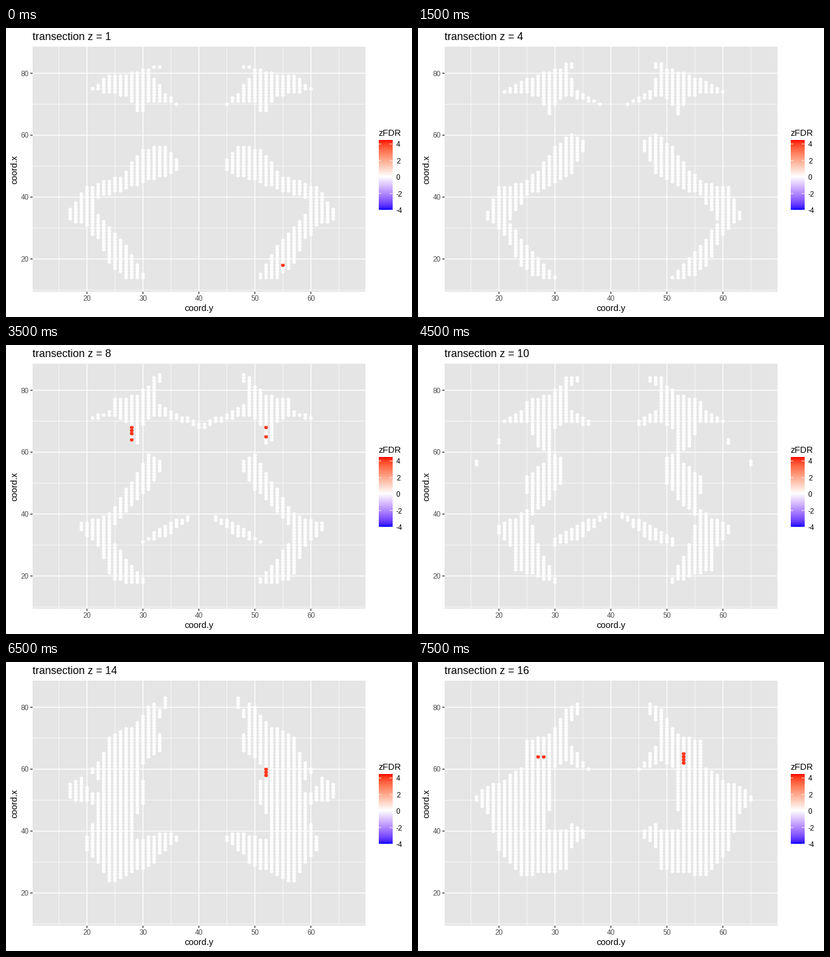
A matplotlib script that plays this animation: 672x480 px, repeating every 8000 ms.

```python
import numpy as np
import matplotlib.pyplot as plt
from matplotlib.animation import FuncAnimation
from matplotlib.colors import ListedColormap, TwoSlopeNorm
from matplotlib.patches import Rectangle

W, H, DPI = 672, 480, 96
LEFT, RIGHT, TOP, BOTTOM = 44, 594.6, 31, 438
NX, NY = 70, 90
DX, DY = 9.265, 5.14
MIRROR = 81
plt.rcParams["font.family"] = "Liberation Sans"


def px(x):
    return 134 + (x - 20) * DX


def py(y):
    return 75.2 + (80 - y) * DY


# Key sections: bands through (column, low, high) points of the left half,
# mirrored to the right half.
masks = {}


def shape(z, *bands):
    mask = masks[z] = np.zeros((NY, NX), bool)
    for band in bands:
        x, low, high = zip(*band)
        for c in range(x[0], x[-1] + 1):
            lo, hi = np.interp(c, x, low), np.interp(c, x, high)
            mask[int(lo + .5):int(hi + .5) + 1, [c, MIRROR - c]] = True


shape(1,
      [(21, 75, 75), (24, 74, 79), (27, 73, 79), (29, 68, 80), (30, 68, 81),
       (31, 71, 81), (34, 71, 73), (36, 70, 70)],
      [(32, 82, 82), (33, 82, 82)],
      [(17, 33, 36), (20, 31, 43), (21, 28, 43)],
      [(22, 40, 44), (26, 42, 46), (30, 45, 55), (34, 47, 56), (36, 49, 52)],
      [(22, 27, 34), (24, 19, 30), (27, 14, 24), (30, 14, 15)])
shape(4,
      [(21, 74, 74), (24, 74, 77), (27, 73, 79), (29, 67, 80), (30, 70, 81),
       (32, 73, 81), (34, 72, 74), (38, 70, 70)],
      [(32, 82, 83), (33, 82, 83)],
      [(18, 33, 35), (20, 30, 43), (22, 33, 43), (25, 41, 45), (27, 42, 48),
       (30, 45, 56), (33, 48, 60), (35, 55, 58)],
      [(21, 28, 34), (24, 18, 26), (26, 15, 22), (29, 14, 16), (30, 14, 14)])
shape(8,
      [(21, 71, 71), (24, 72, 73), (25, 72, 77), (27, 70, 77), (28, 64, 78),
       (29, 63, 78), (30, 69, 80), (32, 72, 82), (33, 72, 75), (36, 71, 72),
       (40, 68, 69)],
      [(32, 80, 84), (33, 83, 85)],
      [(19, 35, 37), (22, 30, 38), (24, 21, 40), (25, 37, 42), (29, 45, 53),
       (31, 48, 59), (33, 54, 57)],
      [(25, 19, 30), (28, 18, 23), (30, 18, 19)],
      [(30, 31, 31), (34, 33, 36), (38, 38, 39)])
shape(10,
      [(21, 70, 70), (24, 70, 73), (25, 70, 76), (27, 62, 77), (29, 60, 78),
       (30, 68, 80), (32, 70, 82), (33, 70, 73), (36, 69, 70)],
      [(32, 81, 84), (34, 83, 84)],
      [(25, 47, 52), (26, 40, 53), (28, 43, 56), (29, 45, 60), (31, 50, 58)],
      [(20, 34, 36), (22, 30, 38), (23, 22, 38), (25, 21, 41), (27, 20, 30),
       (30, 18, 19)],
      [(30, 30, 32), (34, 32, 36), (39, 39, 40)],
      [(20, 63, 64)], [(16, 56, 57)])
shape(12,
      [(15, 52, 53), (18, 54, 57), (21, 58, 64), (24, 60, 72), (25, 46, 74),
       (27, 41, 75), (29, 46, 77), (30, 66, 78), (32, 68, 83), (33, 68, 72),
       (36, 67, 68)],
      [(32, 82, 83), (34, 82, 84)], [(30, 48, 57)],
      [(20, 34, 36), (22, 31, 37), (24, 22, 39), (26, 24, 42), (27, 25, 33),
       (30, 31, 34), (34, 32, 37), (39, 41, 41)])
shape(16,
      [(16, 50, 51), (18, 46, 54), (20, 34, 55), (24, 26, 60), (25, 26, 69),
       (28, 27, 70), (29, 47, 71), (30, 61, 73), (32, 63, 79), (33, 62, 67),
       (36, 60, 60)],
      [(33, 76, 80), (34, 78, 81)],
      [(29, 27, 40), (32, 28, 40), (33, 35, 42), (35, 38, 40)])

# Significant voxels: (column, low, high) runs per section.
hits = {
    1: [(55, 18, 18)],
    8: [(28, 64, 64), (28, 66, 68), (52, 65, 65), (52, 68, 68)],
    14: [(52, 58, 60)],
    16: [(27, 64, 64), (28, 64, 64), (53, 62, 65)],
}

# Sections in between blend the signed distance fields of their neighbours.
gy, gx = np.mgrid[10:NY, 12:NX]
cells = np.column_stack([gx.ravel() * DX, gy.ravel() * DY]).astype("f4")
dist = np.hypot(*(cells[:, None, k] - cells[None, :, k] for k in (0, 1)))


def signed(mask):
    on = mask[10:, 12:].ravel()
    return dist[:, on].min(1) - dist[:, ~on].min(1)


keys = sorted(masks)
fields = {z: signed(masks[z]) for z in keys}


def section(z):
    if z in masks:
        return masks[z].copy()
    a = max(k for k in keys if k < z)
    b = min(k for k in keys if k > z)
    t = (z - a) / (b - a)
    mask = np.zeros((NY, NX), bool)
    blend = (1 - t) * fields[a] + t * fields[b]
    mask[10:, 12:] = (blend <= 1).reshape(gx.shape)
    return mask


def lab_to_rgb(lab):
    fy = (lab[:, 0] + 16) / 116
    f = np.column_stack([fy + lab[:, 1] / 500, fy, fy - lab[:, 2] / 200])
    xyz = np.where(f > 6 / 29, f ** 3, (f - 4 / 29) * 108 / 841)
    xyz *= [.9505, 1, 1.089]
    lin = xyz @ np.array([[3.2406, -.9689, .0557],
                          [-1.5372, 1.8758, -.204],
                          [-.4986, .0415, 1.057]])
    lin = lin.clip(0, 1)
    return np.where(lin > .0031308, 1.055 * lin ** (1 / 2.4) - .055,
                    12.92 * lin).clip(0, 1)


BLUE, WHITE, RED = (32.3, 79.19, -107.86), (100, 0, 0), (53.24, 80.09, 67.2)
ramp = np.vstack([np.linspace(BLUE, WHITE, 128), np.linspace(WHITE, RED, 128)])
cmap = ListedColormap(lab_to_rgb(ramp))
norm = TwoSlopeNorm(vmin=-4, vcenter=0, vmax=4.37)

fig = plt.figure(figsize=(W / DPI, H / DPI), dpi=DPI, facecolor="white")
ax = fig.add_axes([0, 0, 1, 1])
ax.axis("off")


def text(x, y, s, size, color="black", **kw):
    return ax.text(x, y, s, fontsize=size, color=color, **kw)


def line(x, y, color, lw, z):
    ax.plot(x, y, color=color, lw=lw, solid_capstyle="butt", zorder=z,
            snap=False)


ax.add_patch(Rectangle((LEFT, TOP), RIGHT - LEFT, BOTTOM - TOP,
                       fc="#e5e5e5", lw=0, zorder=0))
for v in range(10, 81, 10):
    major = v % 20 == 0
    line([LEFT, RIGHT], [py(v)] * 2, "white", 1.07 if major else .53, 1 + major)
    if major:
        line([LEFT - 3.7, LEFT], [py(v)] * 2, "#333333", 1.07, 2)
        text(38, py(v) + 4.3, v, 8.8, "#4d4d4d", ha="right")
for v in range(15, 66, 5):
    major = v % 10 == 0
    line([px(v)] * 2, [TOP, BOTTOM], "white", 1.07 if major else .53, 1 + major)
    if major:
        line([px(v)] * 2, [BOTTOM, BOTTOM + 3.7], "#333333", 1.07, 2)
        text(px(v), 453.3, v, 8.8, "#4d4d4d", ha="center")

text(319.3, 470, "coord.y", 11, ha="center")
text(18, 234.5, "coord.x", 11, ha="center", rotation=90,
     rotation_mode="anchor")
title = text(44, 20, "", 13.2)

# Colour bar
X0, X1, Y0, Y1 = 616.5, 639.5, 302.3, 187.2
ax.imshow(np.linspace(-4, 4.37, 256)[:, None], cmap=cmap, norm=norm,
          extent=(X0, X1, Y0, Y1), origin="lower", aspect="auto", zorder=2)
text(616, 179, "zFDR", 11)
for v in range(-4, 5, 2):
    y = 247.5 - v * 13.7
    for x in (X0, X1 - 4.6):
        line([x, x + 4.6], [y, y], "white", .7, 3)
    text(646, y + 4.7, v, 8.8)

dots = ax.scatter([], [], s=4.6 ** 2, lw=0, zorder=4)
ax.set(xlim=(0, W), ylim=(H, 0))


def draw(i):
    z = i + 1
    mask, values = section(z), np.zeros((NY, NX))
    for x, low, high in hits.get(z, []):
        mask[low:high + 1, x] = True
        values[low:high + 1, x] = 4
    y, x = np.nonzero(mask)
    dots.set_offsets(np.column_stack([px(x), py(y)]))
    dots.set_facecolors(cmap(norm(values[y, x])))
    title.set_text(f"transection z = {z}")
    return dots, title


anim = FuncAnimation(fig, draw, frames=16, interval=500, repeat=True,
                     repeat_delay=0, blit=False)
plt.show()
```
